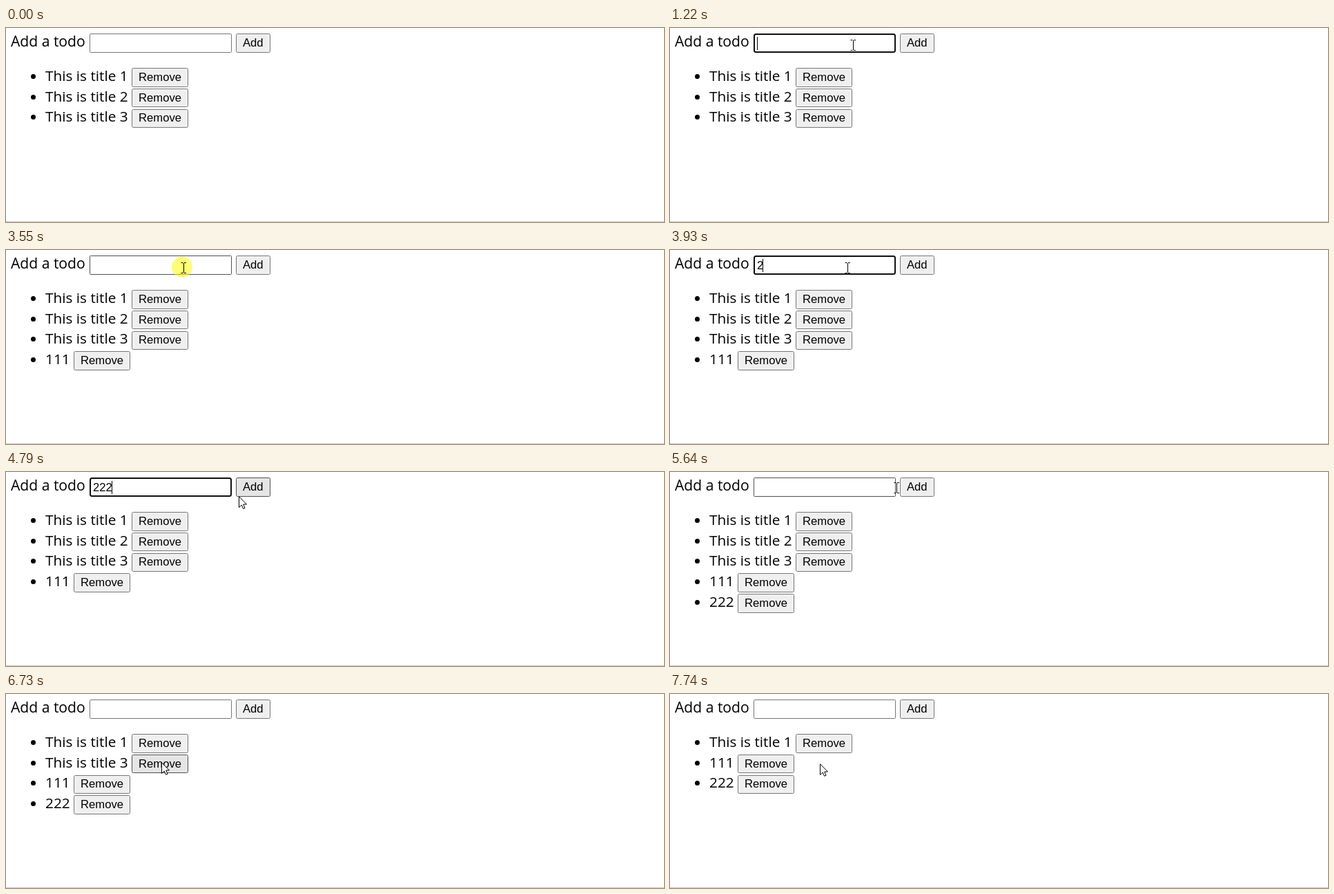
These frames come from a looping animation (953 by 282 pixels, 8000 ms). An HTML page with a canvas:

```html
<!DOCTYPE html>
<html lang="en">
<head>
<meta charset="utf-8">
<title>Todo list</title>
<style>
  html, body { margin: 0; width: 100%; height: 100%; overflow: hidden; background: #fff; }
  canvas { display: block; }
</style>
</head>
<body>
<canvas id="stage" width="953" height="282"></canvas>
<script>
const ctx = document.getElementById('stage').getContext('2d');
const LOOP = 8000, STEP = 76;
const BODY = '"Open Sans", "Noto Sans", sans-serif';
const CONTROL = '16.67px "Liberation Sans", Arial, sans-serif';

const input = { x: 121, y: 8, w: 206, h: 28 };
const addButton = { x: 333, y: 8, w: 50, h: 28 };

// Pointer moves: start, end, target x, target y
const moves = [
  [445, 1045, 263, 24],
  [2375, 2840, 350, 27],
  [3230, 3470, 255, 25],
  [4560, 4790, 337, 35],
  [4870, 4940, 350, 27],
  [5490, 5640, 326, 22],
  [5720, 6270, 227, 95],
  [6350, 6350, 225, 99],
  [7280, 7430, 217, 101]
];
const presses = [[1045, 1220], [2840, 2990], [3550, 3620], [5110, 5170], [6580, 6730], [7660, 7740]];
const sessions = [
  { focus: 1100, keys: [1900, 2130, 2300], char: '1', blur: 2840, clear: 2920 },
  { focus: 3620, keys: [3930, 4160, 4330], char: '2', blur: 5110, clear: 5170 }
];
// Each todo with the time span it is listed
const todos = [
  ['This is title 1', 0, LOOP],
  ['This is title 2', 0, 6660],
  ['This is title 3', 0, 7740],
  ['111', 2920, LOOP],
  ['222', 5170, LOOP]
];

const within = (t, a, b) => t >= a && t < b;
const inside = (p, r) => p && p.x >= r.x && p.x < r.x + r.w && p.y >= r.y && p.y <= r.y + r.h;

function pointerAt(t) {
  if (t < 370) return null;
  let x = 887, y = 239;
  for (const [start, end, tx, ty] of moves) {
    if (t < start) break;
    const count = Math.round((end - start) / STEP) + 1;
    const k = t >= end ? 1 : Math.min(1, (Math.floor((t - start) / STEP) + 1) / count);
    const ease = k * k * (3 - 2 * k);
    x += (tx - x) * ease;
    y += (ty - y) * ease;
  }
  return { x: Math.round(x), y: Math.round(y) };
}

function text(str, x, y, font) {
  ctx.font = font;
  ctx.fillStyle = '#000';
  ctx.fillText(str, x, y);
}

function box(r, fill, stroke, line, radius) {
  ctx.beginPath();
  ctx.roundRect(r.x + line / 2, r.y + line / 2, r.w - line, r.h - line, radius);
  ctx.fillStyle = fill;
  ctx.fill();
  ctx.strokeStyle = stroke;
  ctx.lineWidth = line;
  ctx.stroke();
}

function button(label, r, baseline, pointer) {
  const hover = inside(pointer, r);
  box(r, hover ? '#e5e5e5' : '#efefef', hover ? '#4f4f4f' : '#767676', 1, 2);
  text(label, r.x + 10, baseline, CONTROL);
}

function drawInput(t, pointer) {
  const s = sessions.find(s => within(t, s.focus, s.clear));
  const focused = s && t < s.blur;
  const border = inside(pointer, input) ? '#4f4f4f' : '#767676';
  if (focused) box(input, '#fff', '#101010', 2, 2.5);
  else box(input, '#fff', border, 1, 1);
  if (!s) return;
  const typed = s.keys.filter(k => k <= t);
  const value = s.char.repeat(typed.length);
  text(value, 126, 28, CONTROL);
  const since = t - (typed.length ? typed[typed.length - 1] : s.focus);
  if (focused && Math.floor(since / 500) % 2 === 0) {
    const end = Math.round(126 + ctx.measureText(value).width);
    ctx.fillRect(value ? end - 1 : 126, 13, 1, 19);
  }
}

function drawList(t, pointer) {
  todos.filter(([, from, to]) => within(t, from, to)).forEach(([title], i) => {
    const shift = 29.74 * i;
    const mid = Math.round(69.9 + shift);
    const top = Math.round(58.1 + shift);
    ctx.fillStyle = '#000';
    ctx.beginPath();
    ctx.arc(39.5, mid + 0.5, 3.5, 0, 2 * Math.PI);
    ctx.fill();
    text(title, 57, mid + 7, '20.8px ' + BODY);
    const r = { x: title.length > 3 ? 182 : 98, y: top, w: 82, h: Math.round(85.6 + shift) - top };
    button('Remove', r, mid + 7, pointer);
  });
}

// Suggestion panel under the field
function drawPanel() {
  ctx.save();
  ctx.shadowColor = 'rgba(0,0,0,.15)';
  ctx.shadowBlur = 5;
  ctx.shadowOffsetY = 1;
  ctx.fillStyle = '#fff';
  ctx.beginPath();
  ctx.roundRect(123, 39, 236, 64, 3);
  ctx.fill();
  ctx.restore();
}

function drawPointer(t, p) {
  if (presses.some(([a, b]) => within(t, a, b))) {
    ctx.fillStyle = 'rgba(255,250,0,.53)';
    ctx.beginPath();
    ctx.arc(p.x, p.y, 15, 0, 2 * Math.PI);
    ctx.fill();
  }
  ctx.save();
  ctx.translate(p.x, p.y);
  ctx.lineWidth = 1;
  if (inside(p, input)) {
    ctx.strokeStyle = '#000';
    ctx.stroke(new Path2D('M-1.5 -6.5H1.5M3 -6.5H6M2.5 -6V8M-1.5 8.5H1.5M3 8.5H6'));
  } else {
    const arrow = new Path2D('M.5 .8V16.5L4.2 13L6.6 18.3L9 17.3L6.7 12H11.5Z');
    ctx.fillStyle = '#fff';
    ctx.strokeStyle = '#000';
    ctx.fill(arrow);
    ctx.stroke(arrow);
  }
  ctx.restore();
}

function draw(t) {
  const pointer = pointerAt(t);
  ctx.fillStyle = '#fff';
  ctx.fillRect(0, 0, 953, 282);
  ctx.fillStyle = '#c8c8c8';
  ctx.fillRect(0, 281, 953, 1);
  text('Add a todo', 7, 27, '21.1px ' + BODY);
  drawInput(t, pointer);
  button('Add', addButton, 27, pointer);
  drawList(t, pointer);
  if (within(t, 3620, 3930)) drawPanel();
  if (pointer) drawPointer(t, pointer);
}

const began = performance.now();
function tick() {
  draw((performance.now() - began) % LOOP);
  requestAnimationFrame(tick);
}
tick();
</script>
</body>
</html>
```
